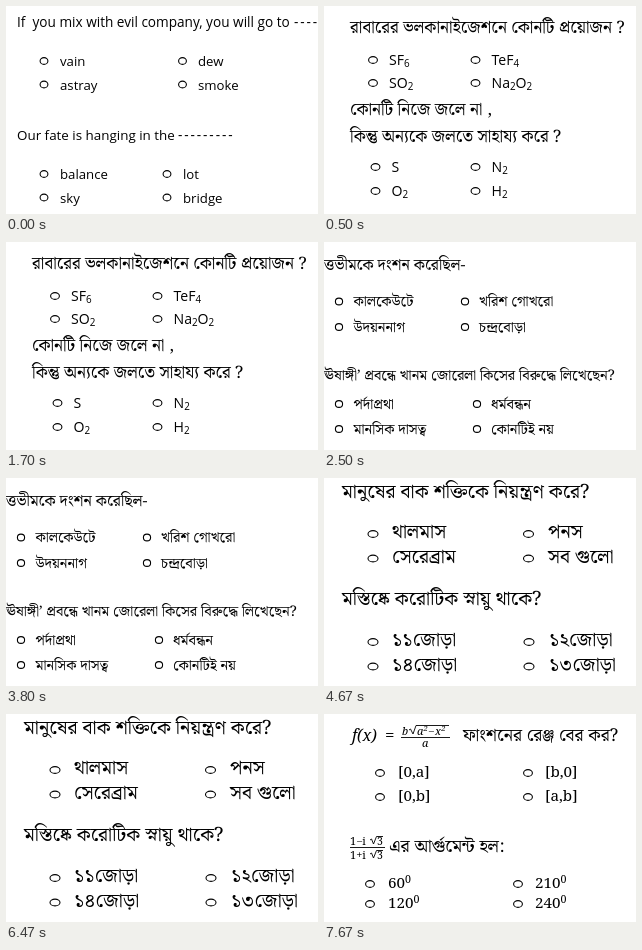
These frames come from a looping animation (312 by 208 pixels, 8 s). An HTML page:

```html
<!DOCTYPE html>
<html lang="bn">
<head>
<meta charset="utf-8">
<title>Quiz cards</title>
<style>
html, body { margin: 0; width: 100%; height: 100%; overflow: hidden; background: #fff; }
svg { display: block; width: 312px; height: 208px; }
text { fill: #000; white-space: pre; }
.en { font-family: "Open Sans", "Noto Sans", sans-serif; }
.bn { font-family: "Noto Serif Bengali", "Noto Sans Bengali", "Noto Sans", sans-serif; }
.math { font-family: "Noto Serif", serif; }
.it { font-style: italic; }
.blank { letter-spacing: 1.9px; }
ellipse, path { fill: none; stroke: #000; }
ellipse { stroke-width: 1.1; }
</style>
</head>
<body>
<svg id="stage" viewBox="0 0 312 208"></svg>
<script>
const NS = "http://www.w3.org/2000/svg";
const LOOP = 8000;
const stage = document.getElementById("stage");

function add(parent, tag, attrs, str) {
  const el = document.createElementNS(NS, tag);
  for (const k in attrs) el.setAttribute(k, attrs[k]);
  if (str) el.textContent = str;
  parent.appendChild(el);
  return el;
}

// "_" lowers and "^" raises the next run of digits.
function label(g, x, y, str, cls, size) {
  const t = add(g, "text", { x, y, class: cls, "font-size": size });
  let back = 0;
  for (const part of str.split(/([_^]\d+)/)) {
    if (!part) continue;
    const mark = /^[_^]\d/.test(part);
    const shift = !mark ? 0 : part[0] === "_" ? 2 : -size * 0.33;
    add(t, "tspan", { dy: shift - back, "font-size": mark ? size * 0.7 : size },
      mark ? part.slice(1) : part);
    back = shift;
  }
}

// Four answers in two columns, read row by row.
function choices(g, rx, dots, xs, ys, drop, words, cls, size) {
  words.forEach((w, i) => {
    const c = i % 2, y = ys[i >> 1];
    add(g, "ellipse", { cx: dots[c], cy: y, rx, ry: 3.4 });
    label(g, xs[c], y + drop, w, cls, size);
  });
}

function idioms(g) {
  label(g, 11, 20.5, "If  you mix with evil company, you will go to", "en", 13.6);
  label(g, 288, 20.5, "----", "en blank", 13.6);
  choices(g, 3.9, [38, 176.5], [54, 192], [55, 78.5], 5, ["vain", "dew", "astray", "smoke"], "en", 13.2);
  label(g, 11, 134, "Our fate is hanging in the", "en", 13.4);
  label(g, 172, 134, "---------", "en blank", 13.6);
  choices(g, 3.9, [38, 161], [54, 177], [168, 191.5], 5, ["balance", "lot", "sky", "bridge"], "en", 13.2);
}

function chemistry(g) {
  const size = 17.1;
  label(g, 26, 26.5, "রাবারের ভলকানাইজেশনে কোনটি প্রয়োজন ?", "bn", size);
  choices(g, 4.4, [49, 151.5], [65, 167.5], [54, 77], 4.5, ["SF_6", "TeF_4", "SO_2", "Na_2O_2"], "en", 14.1);
  label(g, 26, 108.5, "কোনটি নিজে জলে না ,", "bn", size);
  label(g, 26, 135.5, "কিন্তু অন্যকে জলতে সাহায্য করে ?", "bn", size);
  choices(g, 4.4, [51.5, 151.5], [67.5, 167.5], [161, 185], 4.5, ["S", "N_2", "O_2", "H_2"], "en", 14.1);
}

function literature(g) {
  const size = 14.6;
  label(g, 0, 28, "ত্তভীমকে দংশন করেছিল-", "bn", 15.8);
  choices(g, 3.6, [15, 141], [29.5, 155], [59.5, 85], 4.5, ["কালকেউটে", "খরিশ গোখরো", "উদয়ননাগ", "চন্দ্রবোড়া"], "bn", size);
  label(g, 0, 138, "ঊষাঙ্গী’ প্রবন্ধে খানম জোরেলা কিসের বিরুদ্ধে লিখেছেন?", "bn", size);
  choices(g, 3.6, [15, 153], [29.5, 167], [162, 187], 5, ["পর্দাপ্রথা", "ধর্মবন্ধন", "মানসিক দাসত্ব", "কোনটিই নয়"], "bn", size);
}

function biology(g) {
  const size = 19.7;
  label(g, 18, 19.5, "মানুষের বাক শক্তিকে নিয়ন্ত্রণ করে?", "bn", size);
  choices(g, 5, [49, 204.5], [68, 224], [56, 80.5], 4, ["থালমাস", "পনস", "সেরেব্রাম", "সব গুলো"], "bn", size);
  label(g, 18, 127, "মস্তিষ্কে করোটিক স্নায়ু থাকে?", "bn", size);
  choices(g, 5, [49, 205], [68, 225], [164, 188.5], 4, ["১১জোড়া", "১২জোড়া", "১৪জোড়া", "১৩জোড়া"], "bn", size);
}

function maths(g) {
  const line = d => add(g, "path", { d, "stroke-width": 0.9 });
  label(g, 28, 27, "f(x)", "math it", 16);
  label(g, 61, 27, "=", "math", 17);
  line("M77 23.5H126M85 16l1.5-1 2.5 5 3-8.5H125");
  label(g, 78, 20.5, "b", "math it", 11);
  label(g, 93, 20.5, "a^2−x^2", "math it", 11);
  label(g, 98, 33, "a", "math it", 11);
  label(g, 139, 27, "ফাংশনের রেঞ্জ বের কর?", "bn", 17.7);
  choices(g, 4.4, [56, 204], [74, 221], [59, 83], 4, ["[0,a]", "[b,0]", "[0,b]", "[a,b]"], "math", 15.2);
  line("M26 133.5H61M46 126l1.5-1 2 5 3-7.5H59M46 140l1.5-1 2 5 3-7.5H59");
  ["−", "+"].forEach((s, i) => {
    const y = 130.5 + i * 14;
    label(g, 26, y, "1" + s + "i", "math", 11);
    label(g, 53, y, "3", "math", 10.5);
  });
  label(g, 65, 138, "এর আর্গুমেন্ট হল:", "bn", 18);
  choices(g, 4.4, [46, 194], [64, 211], [170, 190], 4, ["60^0", "210^0", "120^0", "240^0"], "math", 15.2);
}

const cards = [[0, idioms], [500, chemistry], [2500, literature], [4670, biology], [7670, maths]]
  .map(([start, draw]) => {
    const g = add(stage, "g", {});
    draw(g);
    return { start, g };
  });

function show(ms) {
  const t = ms % LOOP;
  const now = cards.filter(c => c.start <= t).pop();
  for (const c of cards) c.g.setAttribute("display", c === now ? "inline" : "none");
}

const began = performance.now();
function tick() {
  show(performance.now() - began);
  requestAnimationFrame(tick);
}
show(0);
requestAnimationFrame(tick);
</script>
</body>
</html>
```
